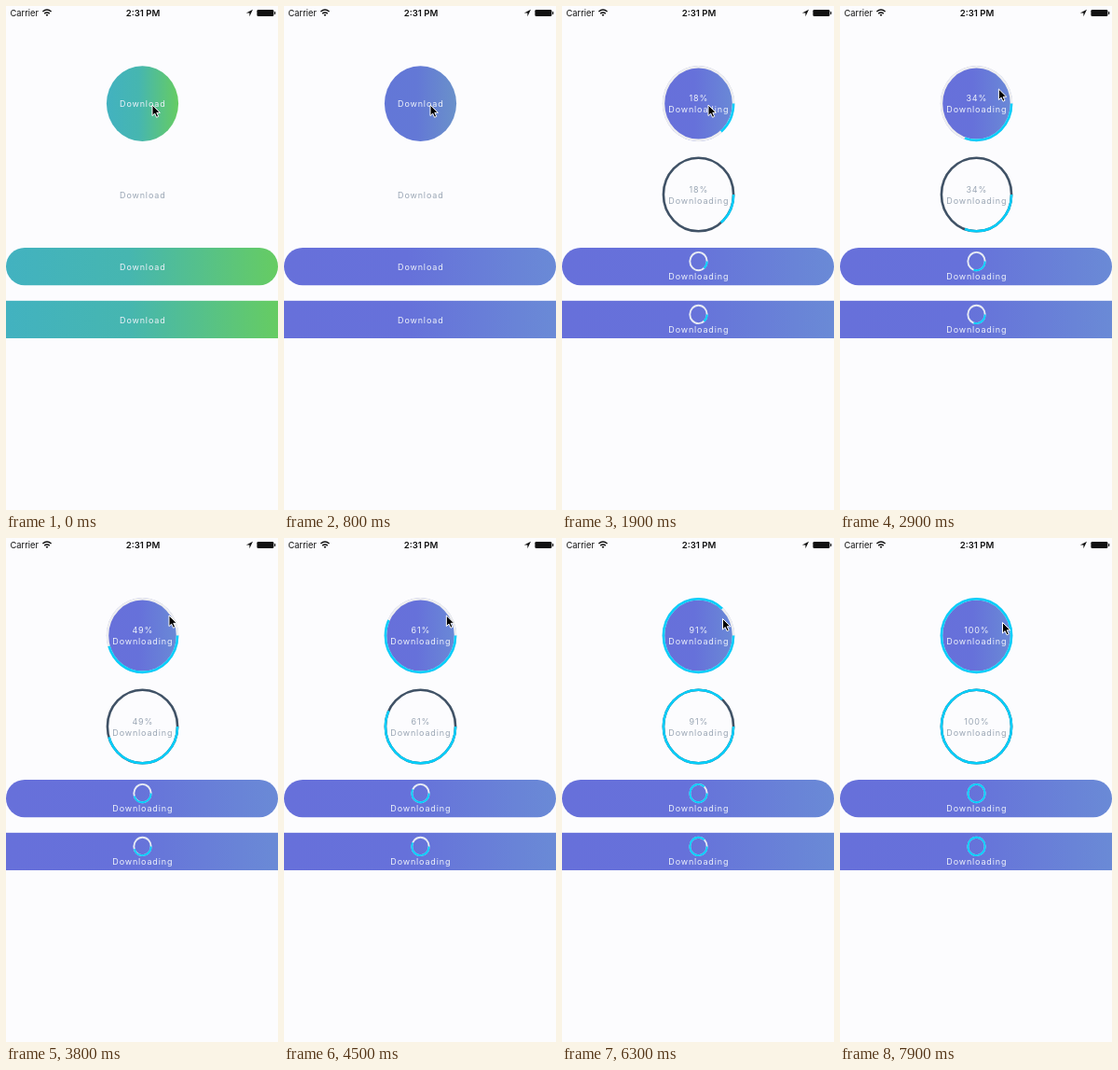
Recreate the animation shown at these times as an HTML page with a canvas. Size 292 by 540 pixels, loop 8 s.

```html
<!DOCTYPE html>
<html lang="en">
<head>
<meta charset="utf-8">
<title>Download buttons</title>
<style>
html, body { margin: 0; width: 100%; height: 100%; overflow: hidden; background: #fcfcfe; }
#stage { position: absolute; left: 0; top: 0; width: 292px; height: 540px; overflow: hidden; }
canvas, svg { position: absolute; left: 0; top: 0; width: 292px; height: 540px; }
.label { font: 9px Inter, Roboto, sans-serif; letter-spacing: .85px; text-anchor: middle; fill: #eef2fa; }
.muted { fill: #9aa6b4; }
.bar { font: 9.3px Inter, Roboto, sans-serif; fill: #111; }
.clock { font-weight: 600; font-size: 9.6px; text-anchor: middle; }
</style>
</head>
<body>
<div id="stage">
  <canvas id="shapes"></canvas>
  <svg id="overlay" viewBox="0 0 292 540">
    <text class="bar" x="4.5" y="10.8">Carrier</text>
    <text class="bar clock" x="147" y="10.9">2:31 PM</text>
    <g fill="none" stroke="#111" stroke-width="1.4">
      <path d="M39.4 6.1Q44 1.9 48.6 6.1"/>
      <path d="M41.2 8.1Q44 5.7 46.8 8.1"/>
    </g>
    <path d="M42.6 9.4Q44 8.3 45.4 9.4L44 11Z" fill="#111"/>
    <path d="M265 3.8L257.8 7.5H261.4V11.2Z" fill="#111"/>
    <rect x="269.4" y="3.9" width="18" height="7.2" rx="1.4" fill="#111"/>
    <rect x="288.1" y="6" width="1.2" height="3" rx=".5" fill="#111"/>
    <g id="labels"></g>
    <path id="cursor" d="M0 0V11.6L2.7 9.1L4.6 13.3L6.7 12.3L4.8 8.3H8.4Z"
      fill="#000" stroke="#fff" stroke-width="1" stroke-linejoin="round"/>
  </svg>
</div>
<script>
const LOOP = 8000, SWITCH = 1000, W = 292, H = 540, CX = 146.5;
const canvas = document.getElementById('shapes');
const ctx = canvas.getContext('2d');
const labels = document.getElementById('labels');
const cursor = document.getElementById('cursor');
const dpr = Math.max(1, window.devicePixelRatio || 1);
canvas.width = W * dpr;
canvas.height = H * dpr;

const clamp = (v, a = 0, b = 1) => Math.min(b, Math.max(a, v));
const mix = (a, b, k) => a + (b - a) * k;
const smooth = k => k * k * (3 - 2 * k);

// Left, middle and right colours of a button, idle and downloading.
const STOPS = [0, .45, 1];
const IDLE = [[66, 178, 192], [70, 182, 176], [102, 204, 98]];
const BUSY = [[103, 112, 218], [102, 113, 218], [106, 138, 214]];

function gradient(x0, x1, k) {
  const g = ctx.createLinearGradient(x0, 0, x1, 0);
  STOPS.forEach((pos, i) => {
    const rgb = IDLE[i].map((v, j) => Math.round(mix(v, BUSY[i][j], k)));
    g.addColorStop(pos, `rgb(${rgb.join(',')})`);
  });
  return g;
}

function ellipse(cy, rx, ry, end = Math.PI * 2) {
  ctx.beginPath();
  ctx.ellipse(CX, cy, rx, ry, 0, 0, end);
}

function ring(cy, rx, ry, width, track, part) {
  ctx.lineWidth = width;
  ctx.strokeStyle = track;
  ellipse(cy, rx, ry);
  ctx.stroke();
  if (part <= 0) return;
  ctx.strokeStyle = '#04cefa';
  ellipse(cy, rx, ry, Math.PI * 2 * part);
  ctx.stroke();
}

function addLabel(y, cls = '') {
  const el = document.createElementNS('http://www.w3.org/2000/svg', 'text');
  el.setAttribute('class', 'label ' + cls);
  el.setAttribute('x', CX + .3);
  el.setAttribute('y', y);
  labels.appendChild(el);
  return el;
}

const buttons = [[105, true], [202.3, true, 'muted'], [279.4, false], [336.4, false]].map(
  ([cy, big, cls]) => ({ cy, big, name: addLabel(cy, cls), percent: big ? addLabel(cy, cls) : null }));

function setLabel(el, text, y) {
  if (el.textContent !== text) el.textContent = text;
  el.setAttribute('y', y);
}

function drawLabels(active, percent) {
  for (const { cy, big, name, percent: el } of buttons) {
    const offset = active ? (big ? 9.2 : 13.4) : 3.3;
    setLabel(name, active ? 'Downloading' : 'Download', cy + offset);
    if (el) setLabel(el, active ? percent + '%' : '', cy - 2.7);
  }
}

// Cursor keys: time, x, y
const PATH = [[0, 157, 106], [2300, 157, 106], [3200, 175, 83], [4300, 175, 83],
  [4900, 172.5, 83], [5500, 172.5, 83], [6200, 172.5, 86.5], [6700, 172.5, 86.5],
  [7300, 174.5, 90.5], [LOOP, 174.5, 90.5]];

function moveCursor(t) {
  let i = 1;
  while (i < PATH.length - 1 && t > PATH[i][0]) i++;
  const a = PATH[i - 1], b = PATH[i];
  const k = smooth(clamp((t - a[0]) / (b[0] - a[0])));
  cursor.setAttribute('transform', `translate(${mix(a[1], b[1], k)} ${mix(a[2], b[2], k)})`);
}

function draw(t) {
  const active = t >= SWITCH;
  const progress = (t - 816) * .0166;
  const part = clamp((progress - 4.2) / 100);
  const barShift = smooth(clamp(t / 800));
  const discShift = smooth(clamp(t / 1000));

  ctx.setTransform(dpr, 0, 0, dpr, 0, 0);
  ctx.fillStyle = '#fcfcfe';
  ctx.fillRect(0, 0, W, H);

  ctx.fillStyle = gradient(107.8, 185.2, discShift);
  ellipse(104.6, 38.6, 40.4);
  ctx.fill();

  ctx.fillStyle = gradient(0, W, barShift);
  ctx.beginPath();
  ctx.roundRect(0, 259, W, 40.2, 20);
  ctx.fill();
  ctx.fillRect(0, 315.8, W, 40.2);

  if (active) {
    ring(104.6, 37.6, 39.3, 2.6, '#eeeef0', part);
    ring(202, 37.6, 39.3, 2.6, '#405266', part);
    ring(273.6, 9.2, 9.7, 1.9, '#e8ecf4', part);
    ring(330.4, 9.2, 9.7, 1.9, '#e8ecf4', part);
  }
  drawLabels(active, Math.floor(clamp(progress, 0, 100)));
  moveCursor(t);
}

const begin = performance.now();
function frame() {
  draw((performance.now() - begin) % LOOP);
  requestAnimationFrame(frame);
}
frame();
</script>
</body>
</html>
```
